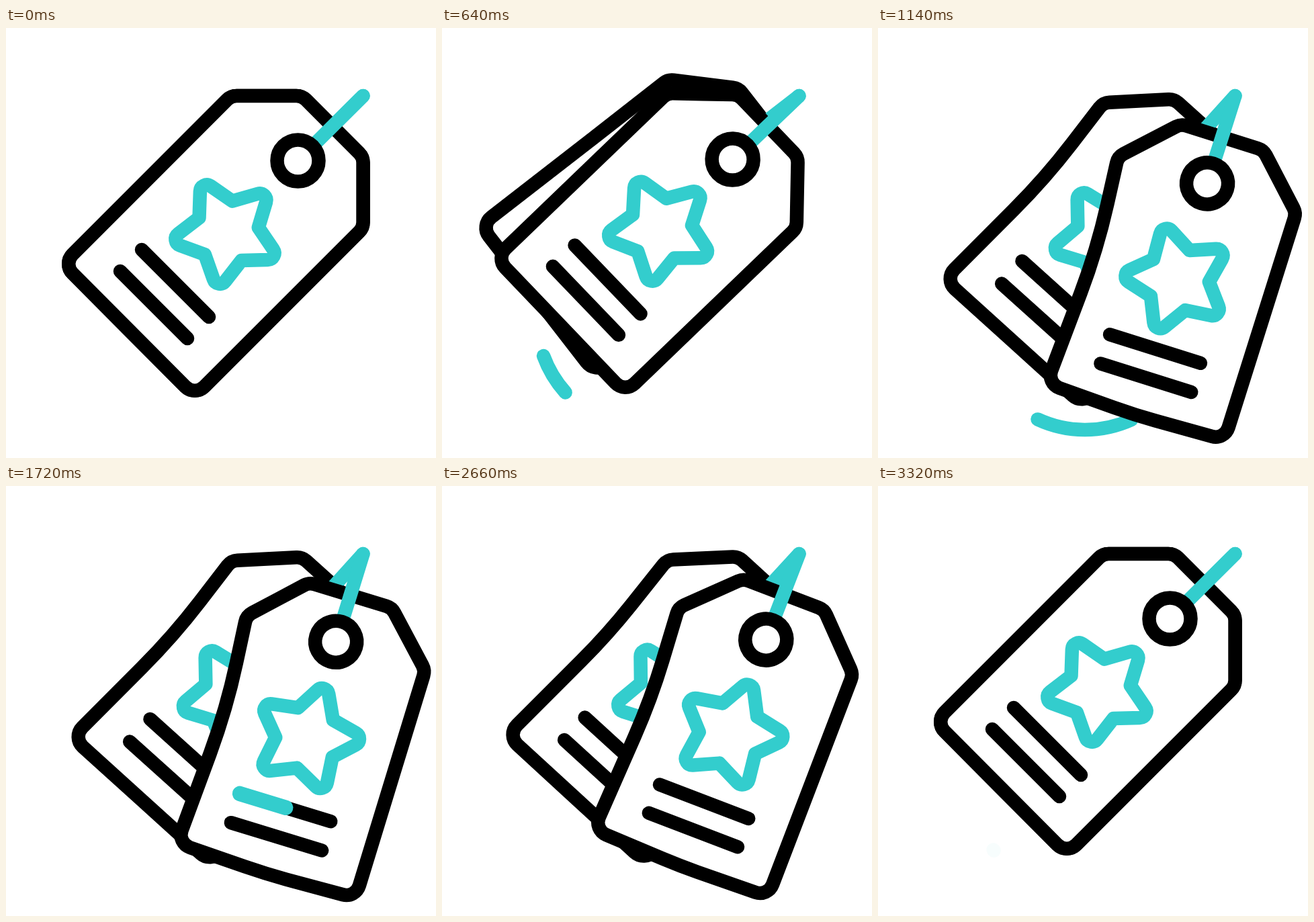
Animation, 640 px wide and 640 px high, one loop 3600 ms. Source, as an HTML page with a canvas:

```html
<!DOCTYPE html>
<html>
<head>
<meta charset="utf-8">
<style>
  html, body { margin: 0; width: 100%; height: 100%; overflow: hidden; background: #fff; }
  canvas { display: block; width: 640px; height: 640px; }
</style>
</head>
<body>
<canvas id="stage" width="640" height="640"></canvas>
<script>
const ctx = document.getElementById('stage').getContext('2d');
const LOOP = 3600, LINE = 20.5;
const CYAN = '#33cdcd', BLACK = '#000';
const PIVOT = [531.5, 101], RING = [434.5, 197.5], STAR = [329.3, 304];
const BARS = [[202, 330], [170, 362]], BAR_LEN = 100;
const rad = d => d * Math.PI / 180;

const smooth = u => u * u * (3 - 2 * u);
const quad = u => u < .5 ? 2 * u * u : 1 - 2 * (1 - u) ** 2;

// Value at time t from [time, value] steps, eased between neighbours.
function at(t, steps, ease = smooth) {
  if (t <= steps[0][0]) return steps[0][1];
  for (let i = 1; i < steps.length; i++) {
    const [t0, a] = steps[i - 1], [t1, b] = steps[i];
    if (t < t1) return a + (b - a) * ease((t - t0) / (t1 - t0));
  }
  return steps[steps.length - 1][1];
}

const MOVES = {
  front: [[220, 0], [530, 3.5], [1190, -28], [2575, -28], [2940, 0]],
  rear: [[220, 0], [500, 11], [905, -3], [2575, -3], [2940, 0]],
  rearBend: [[220, 0], [500, -4], [900, 11], [2575, 11], [2940, 0]],
  spin: [[710, 0], [2530, 360]],
  swingHead: [[460, 160], [1040, 65.5]],
  swingTail: [[860, 160], [1440, 65.5]],
  backHead: [[2660, 66], [3060, 141]],
  backTail: [[2800, 66], [3320, 140.5]],
  backFade: [[3200, 1], [3320, .04]],
  bars: [
    { head: [[1500, 0], [1940, 1]], tail: [[1740, 0], [2140, 1]] },
    { head: [[1740, 0], [2180, 1]], tail: [[1960, 0], [2360, 1]] }
  ]
};

function stroke(color, width = LINE) {
  ctx.strokeStyle = color;
  ctx.lineWidth = width;
  ctx.stroke();
}

function line(x0, y0, x1, y1, color, width) {
  ctx.beginPath();
  ctx.moveTo(x0, y0);
  ctx.lineTo(x1, y1);
  stroke(color, width);
}

// Closed outline through [x, y, cornerRadius] points.
function outline(points) {
  const [a, b] = [points[points.length - 1], points[0]];
  ctx.beginPath();
  ctx.moveTo((a[0] + b[0]) / 2, (a[1] + b[1]) / 2);
  points.forEach(([x, y, r], i) => {
    const next = points[(i + 1) % points.length];
    const last = i === points.length - 1;
    const to = last ? [(x + next[0]) / 2, (y + next[1]) / 2] : next;
    if (r) ctx.arcTo(x, y, to[0], to[1], r);
    else ctx.lineTo(x, y);
  });
  ctx.closePath();
}

function star(spin) {
  const points = [];
  for (let i = 0; i < 10; i++) {
    const tip = i % 2 === 0, r = tip ? 88.6 : 47;
    const a = rad(27.3 + spin + i * 36);
    points.push([STAR[0] + r * Math.cos(a), STAR[1] + r * Math.sin(a), tip ? 10 : 0]);
  }
  outline(points);
  stroke(CYAN);
}

function tag(angle, bend, sag, spin, t) {
  ctx.save();
  ctx.translate(...PIVOT);
  ctx.rotate(rad(angle));
  ctx.translate(-PIVOT[0], -PIVOT[1]);

  const k = Math.SQRT1_2;
  outline([
    [440.5, 101, 20], [531.5, 192, 20], [531.5, 297.5, 20], [281, 548, 20],
    [183 - sag * k, 449.5 + sag * k, 900],
    [85, 351, 20],
    [235 + bend * k, 201 + bend * k, 1000],
    [335, 101, 20]
  ]);
  ctx.fillStyle = '#fff';
  ctx.fill();
  stroke(BLACK);

  star(spin);
  BARS.forEach(([x, y], i) => {
    line(x, y, x + BAR_LEN, y + BAR_LEN, BLACK);
    if (t === undefined) return;
    const head = at(t, MOVES.bars[i].head) * BAR_LEN;
    const tail = at(t, MOVES.bars[i].tail) * BAR_LEN;
    if (head - tail > .5) line(x + tail, y + tail, x + head, y + head, CYAN, 22.5);
  });

  line(...PIVOT, ...RING, CYAN);
  ctx.beginPath();
  ctx.arc(...RING, 31, 0, 2 * Math.PI);
  ctx.fill();
  stroke(BLACK);
  ctx.restore();
}

function swish(from, to, radius, alpha = 1) {
  if (Math.abs(from - to) < .3) return;
  ctx.globalAlpha = alpha;
  ctx.beginPath();
  ctx.arc(308, 431, radius, rad(Math.min(from, to)), rad(Math.max(from, to)));
  stroke(CYAN);
  ctx.globalAlpha = 1;
}

function draw(t) {
  const m = name => at(t, MOVES[name]);
  ctx.fillStyle = '#fff';
  ctx.fillRect(0, 0, 640, 640);
  ctx.lineCap = ctx.lineJoin = 'round';

  swish(m('swingTail'), m('swingHead'), 167);
  swish(m('backTail'), m('backHead'), 175.5, m('backFade'));

  tag(m('rear'), m('rearBend'), 0, 0);
  const front = m('front');
  const lean = Math.max(0, -front / 28);
  tag(front, 12 * lean, 5 * lean, at(t, MOVES.spin, quad), t);
}

const start = performance.now();
function frame() {
  draw((performance.now() - start) % LOOP);
  requestAnimationFrame(frame);
}
frame();
</script>
</body>
</html>
```
